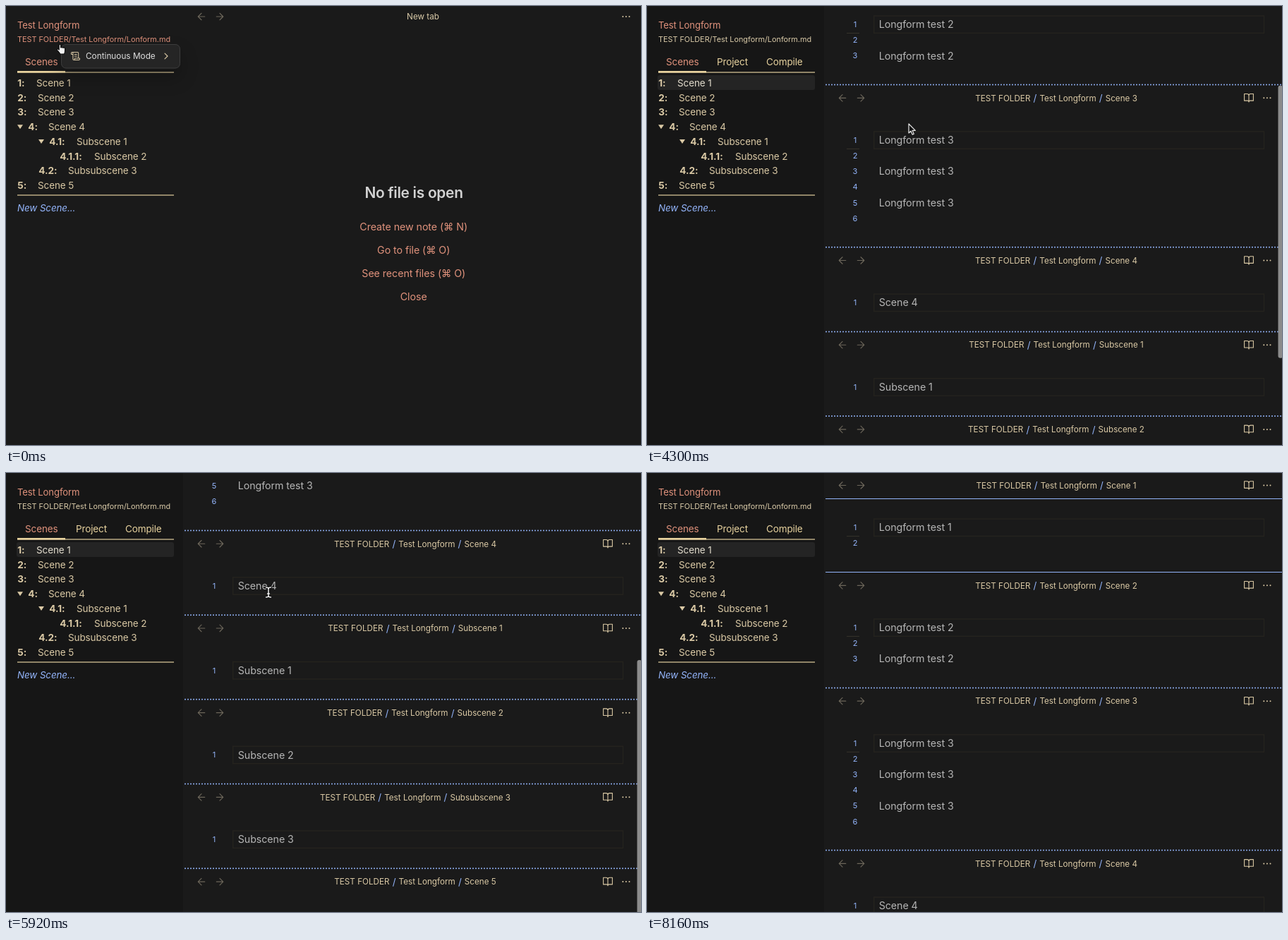
An HTML page with a canvas that plays this animation: 900 by 622 pixels, repeating every 8230 ms.

```html
<!DOCTYPE html>
<html lang="en">
<head>
<meta charset="utf-8">
<title>Continuous mode</title>
<style>
html, body { margin: 0; width: 100%; height: 100%; overflow: hidden; background: #1a1a1a; }
canvas { display: block; width: 900px; height: 622px; }
</style>
</head>
<body>
<canvas id="stage"></canvas>
<script>
const W = 900, H = 622, LOOP = 8230, STEP = 89.6;
const canvas = document.getElementById('stage');
const ctx = canvas.getContext('2d');
const ratio = window.devicePixelRatio || 1;
canvas.width = W * ratio;
canvas.height = H * ratio;

const TAN = '#dac9a5', CORAL = '#e0927c', BLUE = '#93b4fa', GOLD = '#e7d29e';
const LIGHT = '#dedede', GREY = '#b5b5b5', MUTED = '#6c665a', RULE = '#b9a982', BACK = '#1a1a1a';

// weight, size, letter spacing
const FONTS = {
  heading: ['600', 20.9, -0.3],
  body: ['400', 14.25, -0.07],
  list: ['400', 13.5, -0.12],
  number: ['700', 13.6, -0.05],
  italic: ['italic 400', 13.4, -0.1],
  title: ['400', 13.1, -0.12],
  menu: ['400', 11.8, 0],
  ui: ['400', 11.7, 0],
  path: ['400', 10.85, 0],
  gutter: ['400', 11, 0]
};

const FRAME = 'M5 3h14a2 2 0 0 1 2 2v14a2 2 0 0 1-2 2H5a2 2 0 0 1-2-2V5a2 2 0 0 1 2-2z';
const ICONS = {
  back: 'M19 12H5M12 19l-7-7 7-7',
  forward: 'M5 12h14M12 5l7 7-7 7',
  chevron: 'M9 18l6-6-6-6',
  book: 'M2 3h6a4 4 0 0 1 4 4v14a3 3 0 0 0-3-3H2zM22 3h-6a4 4 0 0 0-4 4v14a3 3 0 0 1 3-3h7z',
  scroll: 'M15 12h-5M15 8h-5M19 17V5a2 2 0 0 0-2-2H4M8 21h12a2 2 0 0 0 2-2v-1a1 1 0 0 0-1-1H11a1 1 0 0 0-1 1v1a2 2 0 1 1-4 0V5a2 2 0 1 0-4 0v2a1 1 0 0 0 1 1h3',
  left: FRAME + 'M9 3v18M16 15l-3-3 3-3',
  right: FRAME + 'M15 3v18M8 9l3 3-3 3',
  down: FRAME + 'M3 15h18M15 8l-3 3-3-3',
  up: FRAME + 'M3 9h18M9 16l3-3 3 3',
  append: FRAME + 'M8 8h8M12 8v8M8 12.5l4 4 4-4',
  replace: FRAME + 'M9 10l3-3 3 3M9 14l3 3 3-3'
};
for (const name in ICONS) ICONS[name] = new Path2D(ICONS[name]);

const ARROW = new Path2D('M0 0v13l3-2.8 2.1 4.9 2.2-.9-2.1-4.8h4.1z');
const HAND = new Path2D('M3.2 8V1.6a1.2 1.2 0 0 1 2.4 0V5a1.1 1.1 0 0 1 2 .1 1.1 1.1 0 0 1 2 .4 1.1 1.1 0 0 1 2 .8V9.5q0 2-1.1 4.5H4.8Q4 12 .6 8.6a1.1 1.1 0 0 1 1.5-1.5z');
const IBEAM = new Path2D('M-3.5-7q3.5 0 3.5 2v10q0 2-3.5 2M3.5-7q-3.5 0-3.5 2v10q0 2 3.5 2M-1.5 2h3');

const MENU = [
  [73, 'left', 'Open Longform project in new split left'],
  [95, 'right', 'Open Longform project in new split right'],
  [117, 'down', 'Open Longform project in new split down'],
  [139, 'up', 'Open Longform project in new split up'],
  [173.5, 'append', 'Open or append Longform project in active tab group'],
  [195.5, 'replace', 'Replace active tab group with Longform project']
];

const SCENES = [
  [16, '1:', 43, 'Scene 1'], [16, '2:', 45, 'Scene 2'], [16, '3:', 45, 'Scene 3'],
  [31, '4:', 60, 'Scene 4'], [61, '4.1:', 100, 'Subscene 1'],
  [76, '4.1.1:', 125, 'Subscene 2'], [46, '4.2:', 88, 'Subsubscene 3'], [16, '5:', 45, 'Scene 5']
];

const LINE = 22.1;
const panes = [
  ['Scene 1', 'Longform test 1', 2], ['Scene 2', 'Longform test 2', 3],
  ['Scene 3', 'Longform test 3', 6], ['Scene 4', 'Scene 4', 1],
  ['Subscene 1', 'Subscene 1', 1], ['Subscene 2', 'Subscene 2', 1],
  ['Subsubscene 3', 'Subscene 3', 1], ['Scene 5', 'Scene 5', 1]
].map(([name, text, lines]) => ({ name, text, lines }));
let paneTop = -1.3;
for (const pane of panes) {
  pane.top = paneTop;
  pane.height = 119.7 + LINE * (pane.lines - 1);
  paneTop += pane.height;
}

// Keys are [time, value, ...]; values run linearly between them.
const SCROLL = [[3760, 0], [3850, 10], [4300, 192.6], [5017, 458.7], [5200, 467], [5376, 468],
  [5830, 468], [5920, 452], [6362, 194.6], [6540, 35], [6625, 0]];
const POINTER = [[270, 72, 54], [540, 115, 67], [800, 185, 70], [1254, 298, 69], [1700, 371, 167],
  [1870, 371, 166], [2040, 371, 167], [7060, 371, 167], [7700, 590, 640]];
const SCROLLBAR = [[3760, 0], [3850, 1], [7000, 1], [7270, 0]];

function along(keys, t) {
  if (t <= keys[0][0]) return keys[0].slice(1);
  for (let i = 1; i < keys.length; i++) {
    const a = keys[i - 1], b = keys[i];
    if (t < b[0]) {
      const u = (t - a[0]) / (b[0] - a[0]);
      return a.slice(1).map((v, k) => v + (b[k + 1] - v) * u);
    }
  }
  return keys[keys.length - 1].slice(1);
}

function mix(a, b, u) {
  const channel = (hex, i) => parseInt(hex.slice(1 + 2 * i, 3 + 2 * i), 16);
  const rgb = [0, 1, 2].map(i => Math.round(channel(a, i) + (channel(b, i) - channel(a, i)) * u));
  return `rgb(${rgb})`;
}

function setFont(kind) {
  const [style, size, spacing] = FONTS[kind];
  ctx.font = `${style} ${size}px Inter, "DejaVu Sans", sans-serif`;
  ctx.letterSpacing = spacing + 'px';
  return size;
}

function text(kind, str, x, y, color, align = 'left') {
  const size = setFont(kind);
  ctx.fillStyle = color;
  ctx.textAlign = align;
  ctx.fillText(str, x, y + size * 0.364);
}

function rect(x, y, w, h, color, radius = 0) {
  ctx.fillStyle = color;
  ctx.beginPath();
  ctx.roundRect(x, y, w, h, radius);
  ctx.fill();
}

function line(x1, x2, y, color, width, dash = []) {
  ctx.strokeStyle = color;
  ctx.lineWidth = width;
  ctx.lineCap = dash.length ? 'round' : 'butt';
  ctx.setLineDash(dash);
  ctx.beginPath();
  ctx.moveTo(x1, y);
  ctx.lineTo(x2, y);
  ctx.stroke();
  ctx.setLineDash([]);
}

function icon(name, x, y, color, scale = 0.6) {
  ctx.save();
  ctx.translate(x, y);
  ctx.scale(scale, scale);
  ctx.translate(-12, -12);
  ctx.strokeStyle = color;
  ctx.lineWidth = 1.7;
  ctx.lineCap = ctx.lineJoin = 'round';
  ctx.stroke(ICONS[name]);
  ctx.restore();
}

function panel(x, y, w, h) {
  ctx.save();
  ctx.shadowColor = 'rgba(0,0,0,.24)';
  ctx.shadowBlur = 27 * ratio;
  ctx.shadowOffsetY = 13 * ratio;
  rect(x, y, w, h, '#252525', 7);
  ctx.restore();
  ctx.strokeStyle = '#3c3c3c';
  ctx.lineWidth = 1;
  ctx.beginPath();
  ctx.roundRect(x + 0.5, y + 0.5, w - 1, h - 1, 6.5);
  ctx.stroke();
}

function toolbar(y) {
  icon('back', 277, y, MUTED, 0.68);
  icon('forward', 303, y, MUTED, 0.68);
  for (const dx of [-4.6, 0, 4.6]) rect(877.9 + dx, y - 1, 2, 2, TAN, 1);
}

function sidebar(t, opened, selected) {
  if (opened) rect(0, 0, 251, H, '#161616');
  text('title', 'Test Longform', 16, 27, CORAL);
  text('path', 'TEST FOLDER/Test Longform/Lonform.md', 16, 47.5, t < 350 ? CORAL : '#dacba9');
  text('list', 'Scenes', 27, 79, CORAL);
  text('list', 'Project', 99, 79, GOLD);
  text('list', 'Compile', 169, 79, GOLD);
  line(16, 238, 94, RULE, 1.3);
  line(16, 84, 93.2, GOLD, 2.4);
  if (selected) rect(15, 98, 223, 21, '#242424', 3);
  SCENES.forEach(([nx, number, x, name], i) => {
    const y = 109 + 20.75 * i;
    text('number', number, nx + 0.3, y, TAN);
    text('list', name, x, y, selected && i === 0 ? '#e2dccd' : TAN);
    if (i === 3 || i === 4) {
      const tx = nx - 11;
      ctx.beginPath();
      ctx.moveTo(tx - 4, y - 3);
      ctx.lineTo(tx + 4, y - 3);
      ctx.lineTo(tx, y + 3);
      ctx.fill();
    }
  });
  line(16, 238, 268, RULE, 1.5);
  text('italic', 'New Scene...', 16, 286.5, BLUE);
}

function emptyTab() {
  toolbar(15);
  text('ui', 'New tab', 591, 15, '#dacba9', 'center');
  text('heading', 'No file is open', 578, 264, '#d2d2d2', 'center');
  ['Create new note (⌘ N)', 'Go to file (⌘ O)', 'See recent files (⌘ O)', 'Close']
    .forEach((label, i) => text('body', label, 577.7, 313 + 33.1 * i, CORAL, 'center'));
}

function menus(t, pointer) {
  panel(78, 54, 169, 34.5);
  if (t > 440) rect(83, 60, 159, 23, '#303030', 4);
  icon('scroll', 98.5, 71, TAN);
  text('menu', 'Continuous Mode', 113, 71, LIGHT);
  icon('chevron', 227, 71, TAN, 0.66);
  if (t < 620) return;
  panel(249.5, 55.5, 347, 157);
  for (const [y, name, label] of MENU) {
    if (pointer[0] > 256 && Math.abs(pointer[1] + 2 - y) < 11) rect(256, y - 11, 334, 22, '#323232', 4);
    icon(name, 271, y, TAN);
    text('menu', label, 285.5, y, LIGHT);
  }
}

function crumbs(name, y, lastColor) {
  const parts = ['TEST FOLDER', 'Test Longform', name];
  setFont('ui');
  const widths = parts.map(p => ctx.measureText(p).width);
  let x = 580 - (widths[0] + widths[1] + widths[2] + 26) / 2;
  parts.forEach((part, i) => {
    text('ui', part, x, y, i === 2 ? lastColor : TAN);
    x += widths[i] + 13;
    if (i < 2) text('list', '/', x - 6.5, y, BLUE, 'center');
  });
}

function drawPane(pane, index, scroll, focus, caret) {
  const top = pane.top - scroll, bottom = top + pane.height;
  if (top > H || bottom < -2) return;
  const head = top + 18.8, first = head + 59.8, active = index === 0;
  toolbar(head);
  icon('book', 853, head, TAN, 0.64);
  crumbs(pane.name, head, active ? mix(TAN, LIGHT, focus) : TAN);
  if (active) line(253, W, head + 19, BLUE, 1.1);

  ctx.strokeStyle = '#25231e';
  ctx.lineWidth = 1.4;
  ctx.strokeRect(321.7, first - 12.2, 552.8, 24.4);
  if (pane.lines > 1) line(283, 301, first + 12.3, '#36332b', 1);
  for (let i = 0; i < pane.lines; i++) {
    const y = first + LINE * i;
    text('gutter', i + 1, 295, y, BLUE, 'center');
    if (i % 2 === 0) text('body', pane.text, 328.7, y, active ? mix(GREY, LIGHT, focus) : GREY);
  }
  if (active && caret) rect(328.2, first - 9.5, 1.5, 19, LIGHT);

  if (active) line(253, W, bottom, BLUE, 1.1);
  else line(254, W, bottom, BLUE, 2, [0, 4]);
}

function drawCursor(shape, [x, y]) {
  ctx.save();
  ctx.translate(x, y);
  ctx.lineJoin = ctx.lineCap = 'round';
  if (shape === 'beam') {
    ctx.translate(1, 2);
    for (const [color, width] of [['#111', 3.4], ['#f0f0f0', 1.5]]) {
      ctx.strokeStyle = color;
      ctx.lineWidth = width;
      ctx.stroke(IBEAM);
    }
  } else {
    const hand = shape === 'hand', path = hand ? HAND : ARROW;
    ctx.strokeStyle = hand ? '#111' : '#e8e8e8';
    ctx.fillStyle = hand ? '#f4f4f4' : '#111';
    ctx.lineWidth = 1.2;
    ctx.fill(path);
    ctx.stroke(path);
  }
  ctx.restore();
}

function overText(pane, scroll, y) {
  const first = pane.top - scroll + 78.6;
  return y > first - 13 && y < first + LINE * (pane.lines - 1) + 14;
}

function draw(ms) {
  const t = Math.floor((ms % LOOP + 10) / STEP) * STEP;
  const opened = t > 2500;
  const pointer = along(POINTER, t);
  let shape = t < 350 ? 'hand' : 'arrow';

  ctx.setTransform(ratio, 0, 0, ratio, 0, 0);
  rect(0, 0, W, H, BACK);
  sidebar(t, opened, t > 2590);
  if (opened) {
    const [scroll] = along(SCROLL, t);
    const focus = t < 8050 ? 1 : t < 8150 ? 0.5 : 0;
    const caret = t > 2590 && t < 8050 && Math.floor((t - 3580) / 500) % 2 === 0;
    panes.forEach((pane, i) => drawPane(pane, i, scroll, focus, caret));
    if (t > 3800 && panes.some(pane => overText(pane, scroll, pointer[1]))) shape = 'beam';
    ctx.globalAlpha = along(SCROLLBAR, t)[0];
    rect(894.5, scroll * 0.585, 6.5, 386, '#8c8c8c', 3);
    ctx.globalAlpha = 1;
  } else {
    emptyTab();
    menus(t, pointer);
  }
  drawCursor(shape, pointer);
}

function tick() {
  draw(performance.now());
  requestAnimationFrame(tick);
}
tick();
</script>
</body>
</html>
```
